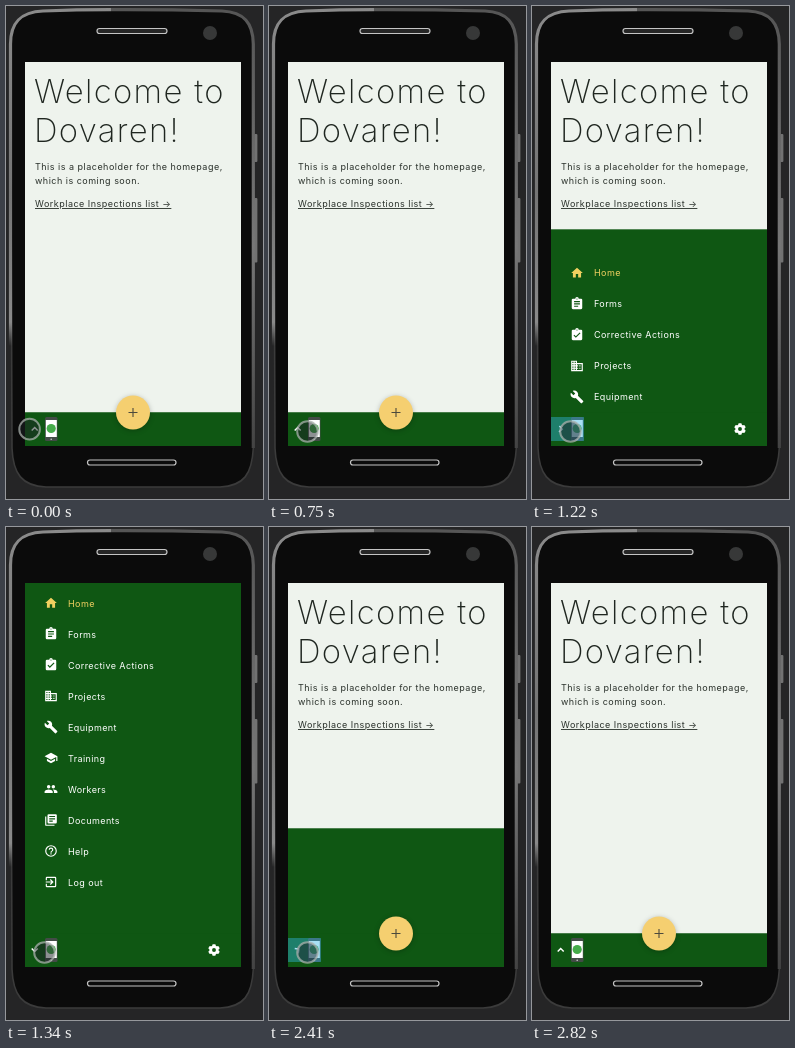
Write an HTML page that moves like this. It is 257 by 493 pixels and loops after 3360 ms.

```html
<!DOCTYPE html>
<html lang="en">
<head>
<meta charset="utf-8">
<title>Mobile menu</title>
<style>
  html, body { margin: 0; width: 100%; height: 100%; overflow: hidden; background: #252526; }
  svg { display: block; width: 257px; height: 493px; }
  text { font-family: Inter, "Open Sans", sans-serif; font-optical-sizing: none; }
  .title { font-size: 32.8px; font-weight: 250; letter-spacing: 1.35px; fill: #1f2620; }
  .body { font-size: 9px; letter-spacing: .49px; fill: #2a312b; }
  .link { text-decoration: underline; text-decoration-thickness: .7px; text-underline-offset: 1.5px; }
  .item { fill: #fff; }
  .item text { font-size: 9px; letter-spacing: .4px; }
  .item path { fill-rule: evenodd; }
  .item.on { fill: #f0d060; }
  #fab circle { filter: drop-shadow(0 1px 2.5px rgba(0, 0, 0, .25)); }
</style>
</head>
<body>
<svg viewBox="0 0 257 493" xmlns="http://www.w3.org/2000/svg">
  <defs>
    <linearGradient id="side" x1="0" y1="0" x2="0" y2="340" gradientUnits="userSpaceOnUse">
      <stop offset="0" stop-color="#8b8b8b"/>
      <stop offset=".55" stop-color="#757575"/>
      <stop offset=".93" stop-color="#8a8a8a"/>
      <stop offset="1" stop-color="#8a8a8a" stop-opacity="0"/>
    </linearGradient>
    <linearGradient id="edge" x1="0" y1="10" x2="0" y2="470" gradientUnits="userSpaceOnUse">
      <stop offset="0" stop-color="#565656"/>
      <stop offset=".5" stop-color="#777"/>
      <stop offset="1" stop-color="#3c3c3c"/>
    </linearGradient>
    <clipPath id="screen"><rect x="19" y="56" width="216" height="384"/></clipPath>
  </defs>

  <rect width="257" height="493" fill="#252526"/>
  <rect x="248" y="128" width="3.4" height="28" rx="1" fill="#727272"/>
  <rect x="248" y="192" width="3.4" height="64.5" rx="1" fill="#727272"/>
  <path d="M4.5 38C4.5 17 14 6 37 5Q126 2 216 5C238 6 247 17 247.300 38V442C246 468 238 480 214 481H40C16 480 7 468 6 442Z"
        fill="#0b0b0b" stroke="#3b3b3b" stroke-width="1.6"/>
  <path d="M247.300 442V38C247 17 238 6 216 5Q160 3.500 105 3.700" fill="none" stroke="url(#edge)" stroke-width="3.2"/>
  <path d="M4.500 340V38C4.500 17 14 6 37 5Q70 3.700 105 3.700" fill="none" stroke="url(#side)" stroke-width="3.2"/>
  <g stroke="#c4c4c4" stroke-width="1.2">
    <rect x="91" y="22.5" width="70" height="5" rx="2.5" fill="#262626"/>
    <rect x="81.5" y="454" width="88.5" height="5" rx="2.5" fill="#0b0b0b"/>
  </g>
  <circle cx="204" cy="27" r="7" fill="#373838"/>

  <g clip-path="url(#screen)">
    <rect x="19" y="56" width="216" height="384" fill="#eef3ed"/>
    <text class="title" x="28" y="97">Welcome to</text>
    <text class="title" x="28" y="136">Dovaren!</text>
    <text class="body" x="29" y="163.5">This is a placeholder for the homepage,</text>
    <text class="body" x="29" y="178">which is coming soon.</text>
    <text class="body link" x="29" y="201">Workplace Inspections list →</text>

    <rect id="sheet" x="19" width="216" height="384" fill="#0f5713"/>
    <g id="list"></g>
    <rect x="19" y="406.5" width="216" height="34" fill="#0f5713"/>

    <path id="chevron" d="M-3 1.5L0-1.5L3 1.5" fill="none" stroke="#fff" stroke-width="1.5"/>
    <rect x="39" y="411" width="12.5" height="24" rx="1.5" fill="#434c47"/>
    <rect x="39.8" y="414" width="11" height="17" fill="#fff"/>
    <circle cx="45.2" cy="422.5" r="4.6" fill="#45ab4a"/>
    <circle cx="45.2" cy="433.3" r=".8" fill="#ccc"/>
    <rect id="tap" x="19" y="411" width="33" height="24" fill="#33b5e5" fill-opacity=".42"/>

    <g id="gear" transform="translate(208 423)"></g>
    <g id="fab">
      <circle cx="127" cy="406.5" r="17" fill="#f5cf70"/>
      <path d="M122.5 406.5h9M127 402v9" stroke="#4c4a3c" stroke-width="1.1"/>
    </g>
  </g>

  <circle id="touch" r="10.3" fill="#1b2226" fill-opacity=".5" stroke="#aab0ac" stroke-opacity=".75" stroke-width="2"/>
</svg>
<script>
const $ = id => document.getElementById(id);
const LOOP = 3360;

const square = (x, y) => `M${x} ${y}h2v2h-2z`;
const board = 'M5 3h4a3 3 0 0 1 6 0h4a2 2 0 0 1 2 2v14a2 2 0 0 1-2 2H5a2 2 0 0 1-2-2V5a2 2 0 0 1 2-2z'
  + 'M12 2.5a1 1 0 0 0 0 2 1 1 0 0 0 0-2z';
const panes = [4, 8].flatMap(x => [5, 9, 13, 17].map(y => square(x, y))).join('');

const items = [
  ['Home', 'M10 20v-6h4v6h5v-8h3L12 3 2 12h3v8z'],
  ['Forms', board + 'M7 7h10v2H7zM7 11h10v2H7zM7 15h7v2H7z'],
  ['Corrective Actions', board + 'M10 17l-4-4 1.4-1.4 2.6 2.6 6.6-6.6L18 9z'],
  ['Projects', 'M2 3h10v4h10v14H2z' + panes + 'M12 9h8v10h-8v-2h2v-2h-2v-2h2v-2h-2z' + square(16, 11) + square(16, 15)],
  ['Equipment', 'M22.7 19l-9.1-9.1c.9-2.3.4-5-1.5-6.9-2-2-5-2.4-7.4-1.3L9 6 6 9 1.6 4.7C.4 7.1.9 10.1 2.9 12.1c1.9 1.9 4.6 2.4 6.9 1.5l9.1 9.1c.4.4 1 .4 1.4 0l2.3-2.3c.5-.4.5-1.1.1-1.4z'],
  ['Training', 'M5 13.2v4L12 21l7-3.8v-4L12 17zM12 3L1 9l11 6 9-4.9V17h2V9z'],
  ['Workers', 'M16 5a3 3 0 0 0 0 6 3 3 0 0 0 0-6zM8 5a3 3 0 0 0 0 6 3 3 0 0 0 0-6zM8 13c-2.3 0-7 1.2-7 3.5V19h14v-2.5c0-2.3-4.7-3.5-7-3.5zM16 13l-1 .1c1.2.8 2 2 2 3.4V19h6v-2.5c0-2.3-4.7-3.5-7-3.5z'],
  ['Documents', 'M4 6H2v14a2 2 0 0 0 2 2h14v-2H4zM20 2H8a2 2 0 0 0-2 2v12a2 2 0 0 0 2 2h12a2 2 0 0 0 2-2V4a2 2 0 0 0-2-2zM9 5h10v2H9zM9 9h10v2H9zM9 13h6v2H9z'],
  ['Help', 'M12 2a10 10 0 0 0 0 20 10 10 0 0 0 0-20zM12 4a8 8 0 0 1 0 16 8 8 0 0 1 0-16z' + square(11, 16) + 'M12 6a4 4 0 0 0-4 4h2a2 2 0 0 1 4 0c0 2-3 1.8-3 5h2c0-2.2 3-2.5 3-5a4 4 0 0 0-4-4z'],
  ['Log out', 'M10.1 15.6L11.5 17l5-5-5-5-1.4 1.4L12.7 11H3v2h9.7zM19 3H5a2 2 0 0 0-2 2v4h2V5h14v14H5v-4H3v4a2 2 0 0 0 2 2h14a2 2 0 0 0 2-2V5a2 2 0 0 0-2-2z']
];

$('list').innerHTML = items.map(([label, d], i) => `
  <g class="item${i ? '' : ' on'}" transform="translate(0 ${76 + i * 31})">
    <path transform="translate(38 -7) scale(.583)" d="${d}"/>
    <text x="62" y="3.5">${label}</text>
  </g>`).join('');

$('gear').innerHTML = '<circle r="3.2" fill="none" stroke="#fff" stroke-width="2.5"/>'
  + [0, 60, 120, 180, 240, 300].map(a =>
    `<path transform="rotate(${a})" d="M-2-3.5L-1.4-5.8H1.4L2-3.5z" fill="#fff"/>`).join('');

// CSS "ease" curve, solved by bisection
function ease(x) {
  if (x <= 0) return 0;
  if (x >= 1) return 1;
  const curve = (a, b, s) => 3 * a * s * (1 - s) ** 2 + 3 * b * s * s * (1 - s) + s ** 3;
  let lo = 0, hi = 1;
  for (let i = 0; i < 24; i++) {
    const mid = (lo + hi) / 2;
    if (curve(.25, .25, mid) < x) lo = mid; else hi = mid;
  }
  return curve(.1, 1, lo);
}

// latest tick that has passed
const hold = (t, ticks) => ticks.filter(k => k <= t).pop();

function openness(t) {
  if (t < 1170 || t >= 2520) return 0;
  if (t >= 1340 && t < 2350) return 1;
  if (t < 1340) return ease((hold(t, [1170, 1220, 1280]) - 1156) / 210);
  return 1 - ease((hold(t, [2350, 2410, 2470]) - 2323.4) / 210);
}

function touchAt(t) {
  if (t >= 2820) return null;
  if (t >= 2760) return [125.5, 485];
  if (t >= 2700) return [66, 444];
  if (t >= 750) return [38.5, 425.5];
  if (t >= 690) return [38.5, 430];
  const step = t < 60 ? 0 : Math.min(10, 1 + Math.floor((t - 60) / 56.6));
  const u = step / 10;
  const angle = Math.PI * (1.03 + 1.47 * Math.min(1, u / .8));
  const pull = Math.max(0, (u - .8) / .2);
  const x = 44 + 20.5 * Math.cos(angle), y = 425 + 19.5 * Math.sin(angle);
  return [x + (38.5 - x) * pull, y + (434.5 - y) * pull];
}

const show = (id, on) => $(id).setAttribute('visibility', on ? 'visible' : 'hidden');

function draw(t) {
  const p = openness(t);
  const open = t >= 1170 && t < 2350;
  $('sheet').setAttribute('y', 406.5 - 350.5 * p);
  $('list').setAttribute('transform', `translate(0 ${400 * (1 - p)})`);
  $('chevron').setAttribute('transform', `translate(28.7 423) rotate(${180 * p})`);
  show('list', open);
  show('gear', open);
  show('fab', !open);
  show('tap', p > 0 && p < 1);
  const pos = touchAt(t);
  show('touch', pos);
  if (pos) $('touch').setAttribute('transform', `translate(${pos})`);
}

const start = performance.now();
function tick() {
  draw((performance.now() - start) % LOOP);
  requestAnimationFrame(tick);
}
tick();
</script>
</body>
</html>
```
